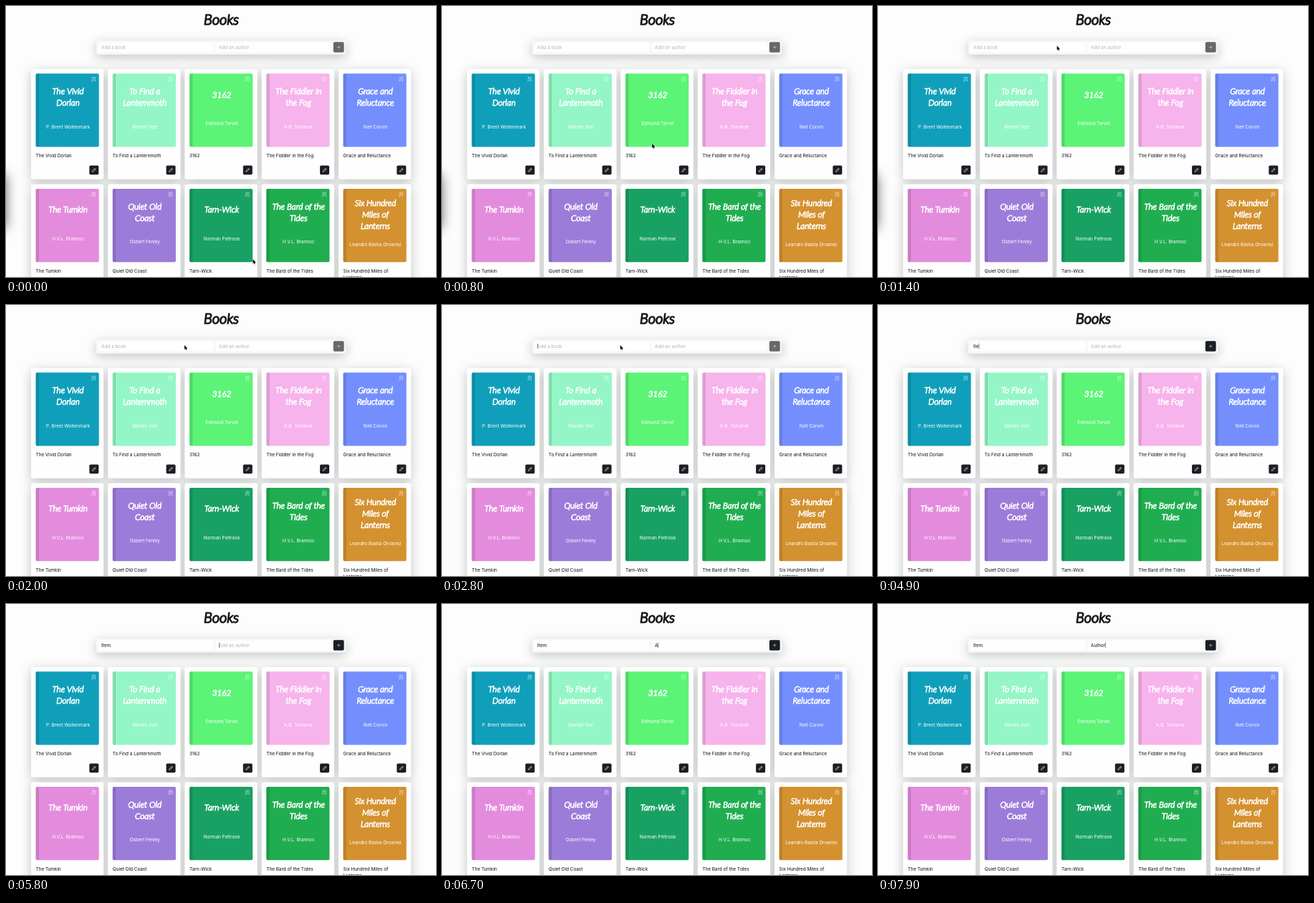
An HTML page with a canvas for the animation above (8000 ms loop, 600 by 378 pixels).

```html
<!DOCTYPE html>
<html lang="en">
<head>
<meta charset="utf-8">
<title>Books</title>
<style>
  html, body { margin: 0; width: 100%; height: 100%; overflow: hidden; background: #fcfdfc; }
  canvas { display: block; width: 600px; height: 378px; }
</style>
</head>
<body>
<canvas id="stage"></canvas>
<script>
const W = 600, H = 378, LOOP = 8000;
const DPR = Math.max(1, window.devicePixelRatio || 1);
const SANS = 'Inter, "Open Sans", sans-serif';
const SCRIPT = 'Lato, "Open Sans", sans-serif';
const INK = '#1b1e24';

// cover colour, title lines, author, caption lines
const BOOKS = [
  ['#109fba', ['The Vivid', 'Dorlan'], 'P. Brent Wollenmark'],
  ['#94f6c6', ['To Find a', 'Lanternmoth'], 'Marlen Voe'],
  ['#5cf477', ['3162'], 'Edmund Tarvel'],
  ['#f7b3ec', ['The Fiddler in', 'the Fog'], 'K.B. Tolvaner'],
  ['#748ffd', ['Grace and', 'Reluctance'], 'Nell Corvin'],
  ['#e38cdd', ['The Tumkin'], 'H.V.L. Brannoc'],
  ['#9c7cd9', ['Quiet Old', 'Coast'], 'Osbert Fenley'],
  ['#19a163', ['Tarn-Wick'], 'Norman Peltrose'],
  ['#20ad50', ['The Bard of the', 'Tides'], 'H.V.L. Brannoc'],
  ['#d4912f', ['Six Hundred', 'Miles of', 'Lanterns'], 'Leandro Bastia Orvanez',
    ['Six Hundred Miles of', 'Lanterns']],
];

// typing schedule: one time per key
const TITLE = { text: 'İtem', x: 133, hint: 'Add a book', keys: [4500, 4700, 4850, 5100] };
const AUTHOR = { text: 'Author', x: 297, hint: 'Add an author', keys: [6600, 6900, 7100, 7300, 7500, 7700] };
const FOCUS = 2600, TAB = 5700;

function makeCanvas(el) {
  el.width = W * DPR;
  el.height = H * DPR;
  const c = el.getContext('2d');
  c.scale(DPR, DPR);
  return c;
}

const stage = document.getElementById('stage');
const view = makeCanvas(stage);
const page = document.createElement('canvas');

function box(c, x, y, w, h, r, fill) {
  c.beginPath();
  c.roundRect(x, y, w, h, r);
  c.fillStyle = fill;
  c.fill();
}

function shadowBox(c, x, y, w, h, r, fill, dy, blur, alpha) {
  c.save();
  c.shadowColor = `rgba(25,35,32,${alpha})`;
  c.shadowBlur = blur * DPR;
  c.shadowOffsetY = dy * DPR;
  box(c, x, y, w, h, r, fill);
  c.restore();
}

function text(c, str, x, y, color, align = 'left') {
  c.font = `6.4px ${SANS}`;
  c.textAlign = align;
  c.textBaseline = 'alphabetic';
  c.fillStyle = color;
  c.fillText(str, x, y);
}

// light letters thickened by a round pen, for a brush-like line
function script(c, str, x, y, size, color) {
  c.font = `italic 300 ${size}px ${SCRIPT}`;
  c.textAlign = 'center';
  c.textBaseline = 'alphabetic';
  c.lineJoin = c.lineCap = 'round';
  c.fillStyle = c.strokeStyle = color;
  c.lineWidth = size * 0.08;
  c.strokeText(str, x, y);
  c.fillText(str, x, y);
}

function line(c, points, color, width, close) {
  c.beginPath();
  points.forEach(([x, y]) => c.lineTo(x, y));
  if (close) c.closePath();
  c.strokeStyle = color;
  c.lineWidth = width;
  c.lineJoin = c.lineCap = 'round';
  c.stroke();
}

function bookmark(c, x, y) {
  const tint = 'rgba(255,255,255,.6)';
  line(c, [[x, y], [x + 4.4, y], [x + 4.4, y + 5.6], [x + 2.2, y + 4.2], [x, y + 5.6]], tint, 0.7, true);
  line(c, [[x + 1.2, y + 2.1], [x + 3.2, y + 2.1]], tint, 0.6);
  line(c, [[x + 2.2, y + 1.1], [x + 2.2, y + 3.1]], tint, 0.6);
}

function pencil(c, x, y) {
  line(c, [[x, y + 5], [x + 0.4, y + 3.5], [x + 3.7, y + 0.2], [x + 4.8, y + 1.3], [x + 1.5, y + 4.6]],
    '#f4f4f4', 0.65, true);
  line(c, [[x + 2.9, y + 1], [x + 4, y + 2.1]], '#f4f4f4', 0.5);
}

function drawCard(c, x, y, [color, title, author, caption]) {
  box(c, x, y, 101, 153.5, 2.5, '#fdfefd');

  const cx = x + 6.4, cy = y + 6.3;
  box(c, cx, cy, 88.2, 102.2, 2, color);
  box(c, cx, cy, 4.2, 102.2, [2, 0, 0, 2], 'rgba(0,0,0,.1)');
  c.fillStyle = 'rgba(0,0,0,.08)';
  c.fillRect(cx + 3.4, cy, 0.8, 102.2);
  bookmark(c, cx + 78.7, cy + 5);

  const n = title.length, mid = cx + 45;
  title.forEach((t, i) => script(c, t, mid, cy + 37.6 - n * 4.4 + i * 15.7, 11.7, '#fff'));
  text(c, author, mid, cy + 68 + n * 4.1, '#fff', 'center');

  (caption || [title.join(' ')]).forEach((t, i) => text(c, t, cx, y + 122.8 + i * 9.5, '#0c0d10'));
  box(c, x + 81.2, y + 134.4, 13, 12.8, 1.8, INK);
  pencil(c, x + 85.3, y + 138.2);
}

function drawPage() {
  const c = makeCanvas(page);
  c.fillStyle = '#fcfdfc';
  c.fillRect(0, 0, W, H);
  script(c, 'Books', 300.5, 26.3, 20, '#16191d');

  shadowBox(c, 126, 48.2, 348, 19.6, 2.5, '#f7f8f7', 4, 15, 0.25);
  box(c, 129, 51, 160.5, 13.5, 1.8, '#fdfefd');
  box(c, 292.3, 51, 161.5, 13.5, 1.8, '#fdfefd');

  const spots = BOOKS.map((b, i) => [35.1 + (i % 5) * 107.25, 88 + Math.floor(i / 5) * 160.7]);
  spots.forEach(([x, y]) => shadowBox(c, x, y, 101, 153.5, 2.5, '#fdfefd', 4, 16, 0.25));
  spots.forEach(([x, y], i) => drawCard(c, x, y, BOOKS[i]));
}

const ramp = (t, a, b) => Math.min(1, Math.max(0, (t - a) / (b - a)));
const ease = p => p * p * (3 - 2 * p);
const mix = (a, b, p) => a + (b - a) * p;

// soft edge of a panel sliding away past the left side
function drawEdge(t) {
  const gone = ramp(t, 1400, 2050);
  if (gone === 1) return;
  const x = -21 - ramp(t, 400, 1400) - 14 * ease(gone);
  shadowBox(view, x, 234, 20, 74, 4, '#555', 2, 17, 0.75 * (1 - gone * 0.5));
}

function drawPointer(t) {
  if (t >= TITLE.keys[0]) return;
  const p = ease(ramp(t, 300, 1250)), q = ease(ramp(t, 1500, 2300));
  view.save();
  view.translate(mix(344.5, 249.7, p) - q, mix(353.2, 55.4, p) + q * 0.7);
  const arrow = [[0, 0], [0, 6.2], [1.4, 5], [2.3, 7], [3.3, 6.5], [2.4, 4.6], [4.3, 4.5]];
  line(view, arrow, 'rgba(255,255,255,.9)', 1, true);
  view.fillStyle = '#050505';
  view.fill();
  view.restore();
}

function drawField(t, field, from, to) {
  const typed = field.keys.filter(k => t >= k);
  const value = field.text.slice(0, typed.length);
  text(view, value || field.hint, field.x, 60, value ? '#0c0d10' : '#b3b6b9');
  if (t < from || t >= to) return;
  const since = t - (typed.length ? typed[typed.length - 1] : from);
  if (since % 1000 >= 500) return;
  view.fillStyle = '#3a3c40';
  view.fillRect(field.x + view.measureText(value).width + 0.1, 53.6, 0.6, 7.6);
}

function drawAdd(t) {
  box(view, 456.8, 50.2, 14.8, 14.5, 1.8, t < TITLE.keys[0] ? '#65676b' : INK);
  line(view, [[462.2, 57.5], [466.2, 57.5]], '#ddd', 0.55);
  line(view, [[464.2, 55.5], [464.2, 59.5]], '#ddd', 0.55);
}

function draw(t) {
  view.drawImage(page, 0, 0, W, H);
  drawEdge(t);
  drawField(t, TITLE, FOCUS, TAB);
  drawField(t, AUTHOR, TAB, LOOP);
  drawAdd(t);
  drawPointer(t);
}

drawPage();
const start = performance.now();
function tick() {
  draw((performance.now() - start) % LOOP);
  requestAnimationFrame(tick);
}
tick();
</script>
</body>
</html>
```
